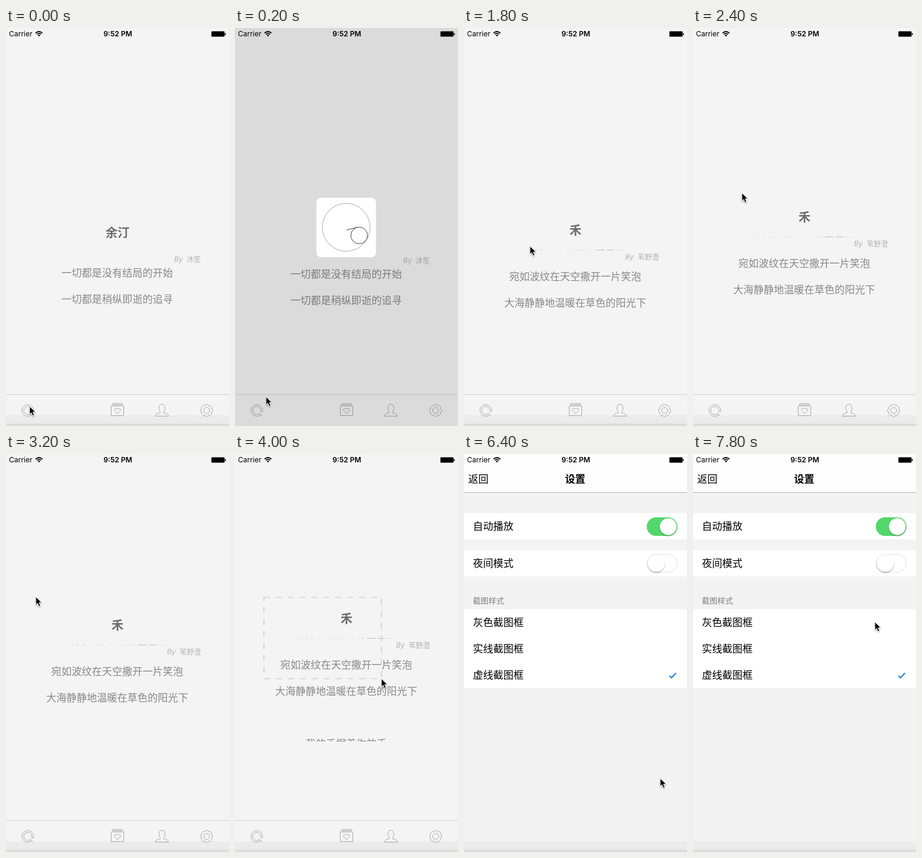
These frames come from a looping animation (374x666 px, 8000 ms). An HTML page:

```html
<!DOCTYPE html>
<html lang="zh-CN">
<head>
<meta charset="utf-8">
<style>
html, body { margin: 0; width: 100%; height: 100%; overflow: hidden; background: #f4f4f4; }
svg { display: block; width: 374px; height: 666px; }
text { font-family: "Noto Sans CJK SC", "Noto Sans CJK", "Noto Sans", sans-serif; font-size: 17px; }
.latin { font-family: Inter, Roboto, sans-serif; font-size: 12px; }
.mid { text-anchor: middle; }
.line { fill: none; stroke: #aaa; }
#poem { fill: #888; }
#title { font-size: 20px; font-weight: 700; fill: #6c6c6c; }
.by { font-size: 12px; fill: #b4b4b4; }
</style>
</head>
<body>
<svg viewBox="0 0 374 666">
  <defs>
    <clipPath id="view"><rect width="374" height="481"/></clipPath>
    <clipPath id="sliver"><rect y="33" width="374" height="1"/></clipPath>
    <filter id="soft" x="-50%" y="-50%" width="200%" height="200%">
      <feDropShadow dx="0" dy="1.5" stdDeviation="1.3" flood-opacity=".35"/>
    </filter>
    <g id="bands">
      <rect y="648" width="374" height="14" fill="#ebebeb"/>
      <rect y="662" width="374" height="4" fill="#dcdcdc"/>
    </g>
  </defs>

  <g id="home">
    <rect width="374" height="666" fill="#f4f4f4"/>
    <g clip-path="url(#view)">
      <g id="poem">
        <text id="title" class="mid" x="187" y="8"></text>
        <g clip-path="url(#sliver)"><text id="hidden" class="mid" x="186" y="47" fill="#bbb">沙滩上的春日花园里面</text></g>
        <text id="by" class="latin by" y="49" font-style="italic">By</text>
        <text id="author" class="by" x="327" y="50" text-anchor="end"></text>
        <text id="l1" class="mid" x="186.5"></text>
        <text id="l2" class="mid" x="186.5"></text>
        <text id="l3" class="mid" x="186.5" y="216"></text>
      </g>
    </g>
    <use id="homeBands" href="#bands"/>
    <path d="M0 613.5H374" stroke="#d2d2d2"/>
    <g class="line">
      <path d="M43 647.2A9.700 9.700 0 1 1 45.900 642.500L43 641.800A6.700 6.700 0 1 0 41 645L45 648.500"/>
      <path d="M176.500 632.500H197.500V648.500H176.500ZM177.500 630.500H196.500M178.500 628.500H195.500"/>
      <path d="M187 645C184 642.500 182 641 182 638.700C182 636 185.800 635.500 187 638C188.200 635.500 192 636 192 638.700C192 641 190 642.500 187 645Z"/>
      <path d="M250.500 649.500C250.500 645.500 254 645.500 258.500 644V642C255.500 639 255.500 629.500 261.500 629.500S267.500 639 264.500 642V644C269 645.500 272.500 645.500 272.500 649.500Z"/>
      <path id="gear"/>
      <circle cx="336.500" cy="640" r="5"/>
    </g>
    <g id="snap">
      <rect id="frame" x="48.500" y="240" fill="none" stroke="#d2d2d2" stroke-width="1.700" stroke-dasharray="10"/>
      <g id="menu">
        <rect x="324" y="444" width="50" height="20" rx="4" fill="#8a8a8a"/>
        <text x="326" y="458" style="font-size:10px">保存</text>
        <text x="351" y="458" style="font-size:10px">分享</text>
      </g>
    </g>
    <g id="loader">
      <rect id="shade" width="374" height="666" opacity=".1"/>
      <rect id="card" x="136.500" y="284" width="100" height="99.500" rx="8" fill="#fff"/>
      <circle id="ring" class="line" cx="186.500" cy="333.500" r="40"/>
      <g fill="none" stroke="#444">
        <circle id="wheel" r="14"/>
        <path id="arm"/>
      </g>
    </g>
  </g>

  <g id="page">
    <rect width="374" height="666" fill="#f3f3f3"/>
    <rect width="374" height="64" fill="#fdfdfd"/>
    <path d="M0 64.500H374" stroke="#b2b2b2"/>
    <path d="M0 99H374V143H0ZM0 161H374V205H0ZM0 260H374V392H0Z" fill="#fff"/>
    <text x="7" y="48">返回</text>
    <text class="mid" x="186.500" y="48" font-weight="700">设置</text>
    <text x="15" y="127">自动播放</text>
    <text x="15" y="189">夜间模式</text>
    <text x="15" y="250" style="font-size:13px" fill="#808080">截图样式</text>
    <text x="15" y="288">灰色截图框</text>
    <text x="15" y="332">实线截图框</text>
    <text x="15" y="376">虚线截图框</text>
    <rect x="306.500" y="106" width="51.500" height="31" rx="15.500" fill="#53d76a"/>
    <circle cx="342.500" cy="121.500" r="14" fill="#fff" filter="url(#soft)"/>
    <rect x="307" y="168" width="50.500" height="30" rx="15" fill="#fff" stroke="#e3e3e3"/>
    <circle cx="322.500" cy="183" r="14" fill="#fff" filter="url(#soft)"/>
    <path d="M344.500 371L348 374.500L355.500 366.500" fill="none" stroke="#1a82d8" stroke-width="2"/>
    <use href="#bands"/>
  </g>

  <g id="status">
    <text class="latin" x="5" y="14">Carrier</text>
    <text class="latin mid" x="187.500" y="14" font-weight="600">9:52 PM</text>
    <g fill="none" stroke="#000" stroke-width="1.700">
      <path d="M49.500 8.500Q55.300 3.500 61 8.500M51.700 10.700Q55.300 7.500 58.800 10.700"/>
    </g>
    <path d="M53.300 12.200Q55.300 10.500 57.300 12.200L55.300 14.300Z"/>
    <rect x="344.500" y="5.500" width="22" height="9" rx="1.500" stroke="#777"/>
    <rect x="367" y="8.500" width="1.500" height="3.500" rx=".7"/>
  </g>

  <path id="cursor" d="M0 0V13.500L3 10.700L5.200 16L7.800 15L5.600 9.800H10Z" stroke="#fff" stroke-width=".9" filter="url(#soft)"/>
</svg>

<script>
const LOOP = 8000, STEP = 200;
const $ = id => document.getElementById(id);
const set = (id, attrs) => { for (const k in attrs) $(id).setAttribute(k, attrs[k]); };
const show = (id, on) => { $(id).style.display = on ? '' : 'none'; };
const move = (id, x, y) => set(id, { transform: `translate(${x} ${y})` });
const clamp = (v, a, b) => Math.min(b, Math.max(a, v));

const poems = [
  { title: '余汀', author: '沐笙', gap: 67, byX: 282, lines: ['一切都是没有结局的开始', '一切都是稍纵即逝的追寻', ''] },
  { title: '禾', author: '苇野澄', gap: 77, byX: 270, lines: ['宛如波纹在天空撒开一片笑泡', '大海静静地温暖在草色的阳光下', '我的手握着你的手'] }
];

// pointer path: time, x, y
const path = [
  [0, 39.5, 633], [200, 52, 617], [1000, 149, 484], [2400, 82, 276], [3200, 50, 239],
  [3600, 48.5, 240], [4200, 344, 444], [4400, 344, 444], [5000, 305, 490], [5600, 305, 490],
  [6000, 336, 634], [6200, 336, 634], [6800, 315, 360], [7800, 305, 281], [8000, 305, 281]
];

function pointer(t) {
  const i = path.findIndex(p => p[0] > t), [t0, x0, y0] = path[i - 1], [t1, x1, y1] = path[i];
  const k = (t - t0) / (t1 - t0);
  return [x0 + (x1 - x0) * k, y0 + (y1 - y0) * k];
}

function gearPath() {
  const n = 8, w = 2 * Math.PI / n, inner = 8.2, outer = 11.8;
  const pt = (a, r) => `${336.5 + r * Math.cos(a)} ${640 + r * Math.sin(a)}`;
  let d = 'M' + pt(w / 2, inner);
  for (let i = 0; i < n; i++) {
    const a = (i + .5) * w;
    d += `C${pt(a, outer)} ${pt(a + w, outer)} ${pt(a + w, inner)}`;
  }
  return d + 'Z';
}

function drawPoem(t) {
  const second = t >= 1000, p = poems[+second];
  const y = second ? clamp(338 - .0375 * (t - 1813), 275, 338) : t < 200 ? 342 : 344;
  move('poem', 0, Math.round(y));
  $('title').textContent = p.title;
  $('author').textContent = p.author;
  p.lines.forEach((s, i) => { $('l' + (i + 1)).textContent = s; });
  set('by', { x: p.byX });
  set('l1', { y: p.gap + 7 });
  set('l2', { y: p.gap + 51 });
  show('hidden', second);
}

// a small wheel rolls inside the ring
function drawLoader(t) {
  const busy = t >= 200 && t < 1000;
  show('loader', t >= 200 && t < 1200);
  for (const id of ['shade', 'card', 'arm']) show(id, busy);
  show('homeBands', !busy);
  const turn = (t - 200) * .175 * Math.PI / 180;
  const a = .56 + turn, b = -1.79 - turn * 26 / 14;
  const x = 186.5 + 25.7 * Math.cos(a), y = 333.5 + 25.7 * Math.sin(a);
  set('wheel', { cx: x, cy: y, opacity: busy ? 1 : .2 });
  set('ring', { opacity: busy ? 1 : .1 });
  set('arm', { d: `M187 338L${x + 14 * Math.cos(b)} ${y + 14 * Math.sin(b)}` });
}

function draw(t) {
  const [x, y] = pointer(t);
  drawPoem(t);
  drawLoader(t);
  show('snap', t >= 3800);
  const k = clamp((t - 3600) / 600, 0, 1);
  set('frame', { width: 295.5 * k, height: 204 * k });
  show('menu', t >= 4600);
  const left = (1 - clamp((t - 6100) / 300, 0, 1)) ** 3;
  show('page', t >= 6200);
  move('page', 374 * left, 0);
  move('home', -112 * (1 - left), 0);
  move('cursor', x, y);
}

set('gear', { d: gearPath() });
const start = performance.now();
function tick() {
  const t = (performance.now() - start) % LOOP;
  draw(Math.floor(t / STEP) * STEP);
  requestAnimationFrame(tick);
}
tick();
</script>
</body>
</html>
```
